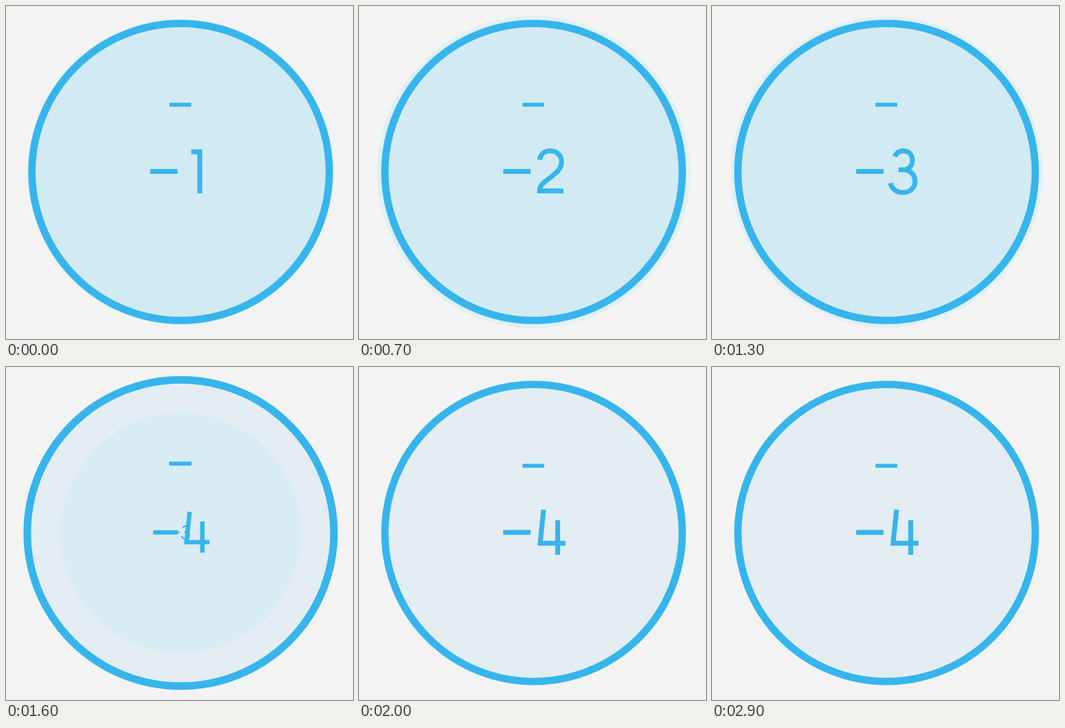
Recreate the animation shown at these times as an HTML page with a canvas. Size 640 by 615 pixels, loop 3000 ms.

```html
<!DOCTYPE html>
<html lang="en">
<head>
<meta charset="utf-8">
<title>Tap counter</title>
<style>
html, body { margin: 0; width: 100%; height: 100%; overflow: hidden; background: #f3f3f3; }
canvas { display: block; }
</style>
</head>
<body>
<canvas id="stage" width="640" height="615" role="img" aria-label="Counter going from -1 to -4"></canvas>
<script>
const ctx = document.getElementById('stage').getContext('2d');
const LOOP = 3000, STEP = 100;
const GROW = 333, SETTLE = 200;
const CX = 322, CY = 306.5, RADIUS = 281, STROKE = 13.5;
const BLUE = '#36b5ec', FILL = '#e3edf2', BACK = '#f3f3f3';

// Each tap starts a transition to the next value.
const taps = [
  { at: -493, value: 1, x: 382, y: 392 },
  { at: 275, value: 2, x: 377, y: 394 },
  { at: 862, value: 3, x: 388, y: 391 },
  { at: 1375, value: 4, x: 382, y: 392 }
];

const digits = {
  1: 'M341.5 269.3H357.5V346',
  2: 'M333 284C335 273 343 267.5 353 267.5C365 267.5 373.5 276 373.5 288C373.5 300 365 307 354 316C342 325 333 330 333 341.5H377',
  3: 'M337 278C340 271 346 267.5 353 267.5C363 267.5 369.5 275 369.5 285C369.5 295 363 302.5 353 302.5H344' +
     'M353 302.5C366 302.5 374.5 312 374.5 324C374.5 336 365 344.5 352 344.5C340 344.5 331 337 329 327',
  4: 'M340.5 263.5L334 325.5H381M366.5 283V347'
};
const minus = 'M266 305.5H316.5';
const glyphs = {};
for (const d in digits) glyphs[d] = new Path2D(minus + digits[d]);

const clamp = v => Math.min(1, Math.max(0, v));
const smooth = v => { v = clamp(v); return v * v * (3 - 2 * v); };

function disc(x, y, r, color) {
  ctx.beginPath();
  ctx.arc(x, y, r, 0, Math.PI * 2);
  ctx.fillStyle = color;
  ctx.fill();
}

function ring(x, y, r, width, color) {
  ctx.beginPath();
  ctx.arc(x, y, r, 0, Math.PI * 2);
  ctx.lineWidth = width;
  ctx.strokeStyle = color;
  ctx.stroke();
}

function scaleAbout(x, y, s) {
  ctx.translate(x, y);
  ctx.scale(s, s);
  ctx.translate(-x, -y);
}

function drawNumber(value, scale) {
  if (!glyphs[value] || scale < 0.01) return;
  ctx.save();
  scaleAbout(CX, 305.5, scale);
  ctx.lineWidth = 9;
  ctx.strokeStyle = BLUE;
  ctx.stroke(glyphs[value]);
  ctx.restore();
}

function drawRipple(age, p) {
  if (age >= GROW + SETTLE) return;
  const u = clamp(age / GROW);
  const r = 294 * p - 13 * smooth((age - GROW) / SETTLE);
  disc(CX, CY, r, `rgba(85,212,242,${0.12 * (0.2 + 0.8 * u * u)})`);
}

function drawTouch(tap, t) {
  const age = t - tap.at;
  const alpha = age < 0 ? clamp(1 + age / 60) : clamp(1 - age / 210);
  if (!alpha) return;
  ctx.globalAlpha = alpha;
  disc(tap.x, tap.y, 19.5, '#fbfbfe');
  ring(tap.x, tap.y, 19.7, 2.6, '#b9c6df');
  ctx.globalAlpha = 1;
}

function draw(t) {
  const tap = taps.filter(k => k.at <= t).pop();
  const age = t - tap.at;
  const p = smooth(age / GROW);
  const pulse = 1 + 12.5 / RADIUS * Math.sin(Math.PI * p);

  ctx.fillStyle = BACK;
  ctx.fillRect(0, 0, 640, 615);
  disc(CX, CY, (RADIUS - 5) * pulse, FILL);
  drawRipple(age, p);

  ctx.save();
  scaleAbout(CX, CY, pulse);
  ring(CX, CY, RADIUS - STROKE / 2, STROKE, BLUE);
  ctx.fillStyle = BLUE;
  ctx.fillRect(301.5, 178.7, 40, 7.3);
  drawNumber(tap.value - 1, 1 - Math.pow(p, 1.25));
  drawNumber(tap.value, 0.5 + 0.5 * p);
  ctx.restore();

  taps.forEach(k => drawTouch(k, t));
}

const start = performance.now();
function tick() {
  const t = (performance.now() - start) % LOOP;
  draw(Math.floor(t / STEP) * STEP);
  requestAnimationFrame(tick);
}
tick();
</script>
</body>
</html>
```
